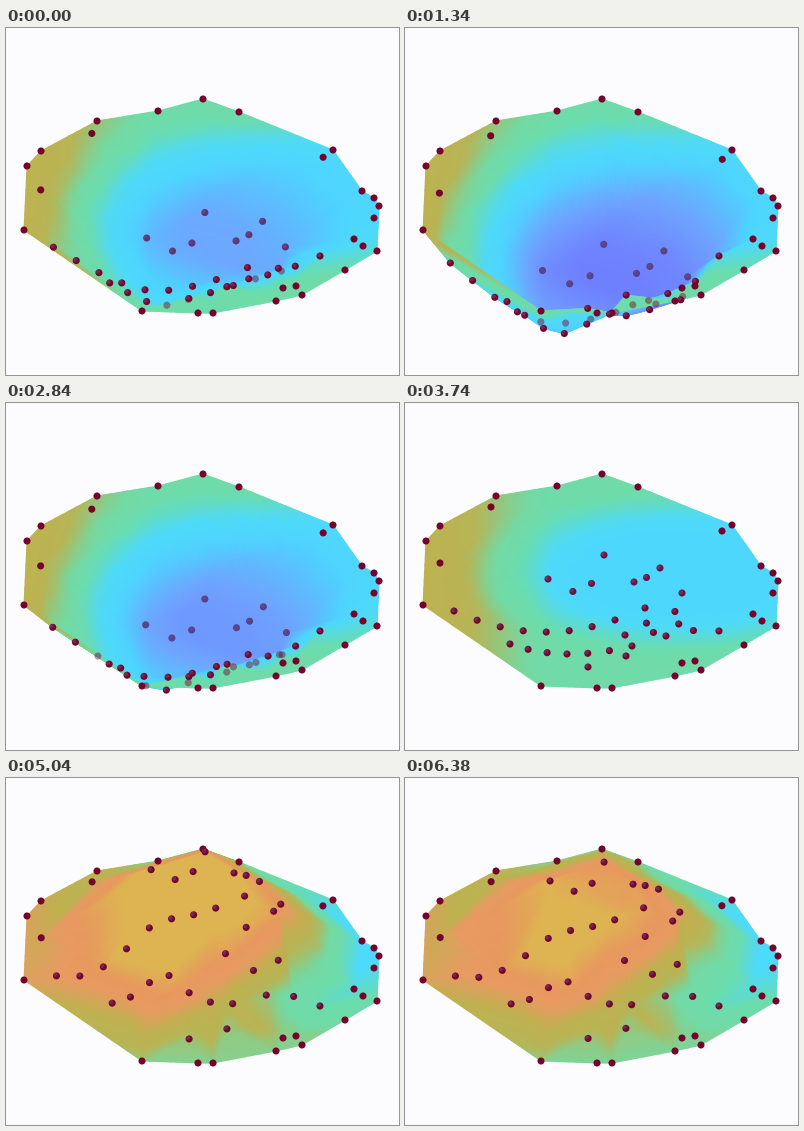
A matplotlib script for the animation above (6.4 s loop, 393x347 px).

```python
import numpy as np
import matplotlib.pyplot as plt
from matplotlib.animation import FuncAnimation
from matplotlib.collections import TriMesh
from matplotlib.colors import LinearSegmentedColormap, Normalize
from matplotlib.tri import TriAnalyzer, Triangulation

W, H, DPI = 393, 347, 100
STEP, LOOP = 20, 6400
SPLIT = 8  # subdivisions per face edge

# Fixed outline, clockwise, then a few nodes just inside it.
OUTLINE = [
    (18, 202), (21, 138), (35, 123), (91, 93), (152, 83), (197, 71),
    (233, 84), (327, 122), (356, 163), (368, 170), (373, 178), (368, 190),
    (371, 223), (339, 242), (296, 267), (270, 273), (207, 285), (192, 285),
    (136, 283),
]
PINS = [(35, 160), (86, 104), (317, 128), (348, 211), (357, 218),
        (277, 260), (290, 258)]

# Loose nodes lie on curves: start, control, end, count.
ARCS = [
    ((143, 176), (185, 210), (199, 152), 4),
    ((229, 179), (241, 177), (255, 165), 3),
    ((49, 208), (130, 245), (210, 217), 8),
    ((105, 241), (158, 260), (227, 243), 7),
    ((240, 205), (238, 232), (261, 233), 4),
    ((277, 190), (252, 233), (314, 228), 5),
    ((183, 264), (202, 258), (221, 253), 2),
    ((220, 232), (220, 232), (220, 232), 1),
]

# Region that swings, with the ramp width along each side.
SWING = np.array([(34, 212), (34, 123), (196, 58),
                  (320, 128), (320, 226), (140, 282)], float)
RAMP = [40, 100, 100, 65, 40, 55]
RISE, DROP = 88, 75

# Sag over time: 0 is the dome, 1 the deep bowl.
KEYS = np.array([(0, .72), (1340, .945), (2050, 1.02), (2840, .8),
                 (3740, .5), (4600, .09), (5200, -.01), (6400, .07)])
KEY_T, KEY_V = KEYS.T
KEY_D = np.gradient(KEY_V, KEY_T)

STOPS = [
    (-3, (112, 104, 255)), (-1.3, (110, 165, 255)), (-.4, (78, 212, 255)),
    (.3, (78, 218, 250)), (.9, (108, 220, 172)), (1.4, (115, 218, 165)),
    (1.9, (185, 180, 85)), (2.4, (190, 178, 80)), (2.9, (232, 155, 98)),
    (3.4, (232, 152, 95)), (4, (222, 180, 82)),
]
CMAP = LinearSegmentedColormap.from_list(
    "height", [((v + 3) / 7, np.array(c) / 255) for v, c in STOPS], N=512)


def arc(start, control, end, count):
    u = np.linspace(0, 1, count)[:, None]
    a, b, c = np.array([start, control, end], float)
    return (1 - u) ** 2 * a + 2 * u * (1 - u) * b + u * u * c


def cross(a, b):
    return a[..., 0] * b[..., 1] - a[..., 1] * b[..., 0]


def freedom(p):
    """How far a node may swing: 0 at the rim, 1 in the middle."""
    free = np.ones(len(p))
    for a, b, width in zip(SWING, np.roll(SWING, -1, axis=0), RAMP):
        u = np.clip(cross(b - a, p - a) / np.hypot(*(b - a)) / width, 0, 1)
        free = np.minimum(free, u * u * (3 - 2 * u))
    return free


def sag(t):
    """Cubic Hermite curve through the keys."""
    k = int(np.clip(np.searchsorted(KEY_T, t, "right") - 1, 0, len(KEYS) - 2))
    h = KEY_T[k + 1] - KEY_T[k]
    u = (t - KEY_T[k]) / h
    return ((1 + 2 * u) * (1 - u) ** 2 * KEY_V[k]
            + u * (1 - u) ** 2 * h * KEY_D[k]
            + u * u * (3 - 2 * u) * KEY_V[k + 1]
            + u * u * (u - 1) * h * KEY_D[k + 1])


loose = np.vstack([arc(*a) for a in ARCS])
rest = np.vstack([OUTLINE, PINS, loose])
free = freedom(rest)
free[:len(OUTLINE)] = 0
up, down = RISE * free, DROP * free ** .4


def nodes(s):
    """Parabola through the raised, level and sunk positions."""
    k = 2 * s - 1
    y = rest[:, 1] + k * (up + down) / 2 + k * k * (down - up) / 2
    x = 202 + (rest[:, 0] - 202) * (1 + .0009 * (up + down) * (s * s - .25))
    return np.column_stack([x, y])


coarse = Triangulation(*rest.T)
coarse.set_mask(TriAnalyzer(coarse).get_flat_tri_mask(.035, rescale=False))
faces = coarse.get_masked_triangles()
nearer = rest[faces, 1].mean(1)[None] > rest[:, 1][:, None]

# Template that splits one face into small triangles.
cell_id = {}
for i in range(SPLIT + 1):
    for j in range(SPLIT + 1 - i):
        cell_id[i, j] = len(cell_id)
bary = np.array([(i, j, SPLIT - i - j) for i, j in cell_id]) / SPLIT
template = []
for i, j in cell_id:
    if i + j < SPLIT:
        template.append([cell_id[i, j], cell_id[i + 1, j], cell_id[i, j + 1]])
    if i + j < SPLIT - 1:
        template.append([cell_id[i + 1, j], cell_id[i + 1, j + 1],
                         cell_id[i, j + 1]])


def spread(p):
    """Node values carried over to every small vertex."""
    return np.einsum("kc,fcd->fkd", bary, p[faces]).reshape(-1, 2)


flat = spread(rest)
offset = len(bary) * np.arange(len(faces))[:, None, None]
cells = (offset + np.array(template)).reshape(-1, 3)
cells = cells[np.argsort(flat[cells, 1].mean(1), kind="stable")]  # far first

# Colour level of the flat sheet: low on the right, high at the left.
dist = np.hypot((flat[:, 0] - 275) / 155, (flat[:, 1] - 170) / 62)
level = (np.clip(.5 + 1.6 * (dist - 1), -.1, 1.15)
         + .009 * np.maximum(150 - flat[:, 0], 0))


def hidden(p):
    """True for nodes covered by a nearer face."""
    a, b, c = (p[faces[:, k]][None] - p[:, None] for k in range(3))
    d = np.stack([cross(a, b), cross(b, c), cross(c, a)])
    inside = (d > 0).all(0) | (d < 0).all(0)
    return (inside & nearer).any(1)


fig = plt.figure(figsize=(W / DPI, H / DPI), dpi=DPI, facecolor="#fcfcff")
ax = fig.add_axes([0, 0, 1, 1])
ax.set_xlim(0, W)
ax.set_ylim(H, 0)
ax.axis("off")

fine = Triangulation(flat[:, 0].copy(), flat[:, 1].copy(), cells)
sheet = TriMesh(fine, array=level, cmap=CMAP, norm=Normalize(-3, 4))
ax.add_collection(sheet, autolim=False)
dots = ax.scatter(*rest.T, s=26, linewidths=0, zorder=3)
tints = ax.scatter(*rest.T, s=9, linewidths=0, zorder=4)

MAROON, DUSK = np.array([.46, .01, .17]), np.array([.30, .33, .68])
is_loose = np.arange(len(rest)) >= len(OUTLINE) + len(PINS)
far = is_loose & (rest[:, 1] < 200)


def draw(i):
    s = sag(i * STEP)
    p = nodes(s)
    v = spread(p)
    fine.x[:], fine.y[:] = v.T
    lift = flat[:, 1] - v[:, 1]
    sheet.set_array(level + lift / np.where(lift > 0, 22, 30)
                    + .8 * max(0, .5 - s))
    covered = hidden(p)
    dusk = (far * np.clip((s - .4) / .4, 0, 1) * .75)[:, None]
    color = MAROON + (DUSK - MAROON) * dusk
    dots.set_offsets(p)
    dots.set_facecolors(np.column_stack([color, np.where(covered, .45, 1)]))
    tints.set_offsets(p - 1)
    glint = np.where(is_loose & ~covered, .5, 0)
    tints.set_facecolors([(.40, .32, .48, a) for a in glint])
    return sheet, dots, tints


anim = FuncAnimation(fig, draw, frames=LOOP // STEP, interval=STEP,
                     repeat=True, repeat_delay=0)
plt.show()
```
